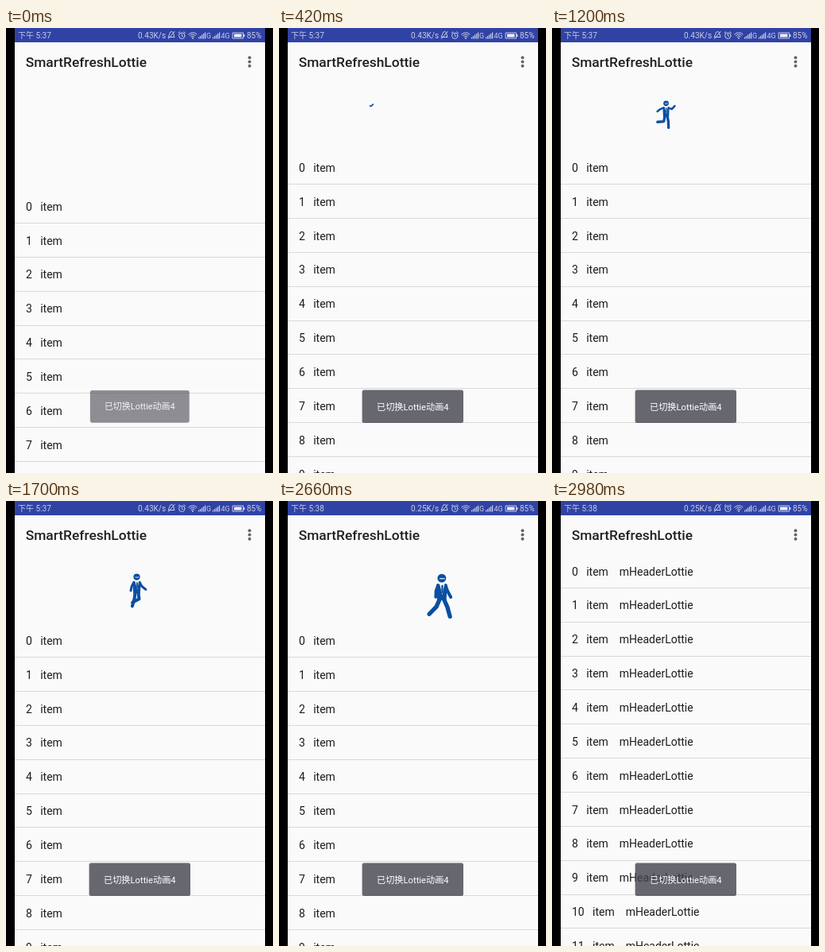
An HTML page with a canvas for the animation above (3040 ms loop, 336 px wide and 560 px high).

```html
<!DOCTYPE html>
<html lang="zh">
<head>
<meta charset="utf-8">
<style>
html, body { margin: 0; width: 100%; height: 100%; overflow: hidden; background: #000; }
canvas { display: block; width: 336px; height: 560px; }
</style>
</head>
<body>
<canvas id="stage"></canvas>
<script>
const W = 336, H = 560, LOOP = 3040;
const LEFT = 11, RIGHT = 326, LIST_TOP = 67, ROW = 42.87;
const PULLED = 136.6, HELD = 87.3;
const FONT = 'Roboto, "Noto Sans CJK SC", "Noto Sans CJK", sans-serif';
const BG = '#fafafa', BLUE = '#0b4fa2', LIGHT = '#c9cdea';
const { PI, sin, cos, max } = Math;

const canvas = document.getElementById('stage');
const c = canvas.getContext('2d');
const dpr = window.devicePixelRatio || 1;
canvas.width = W * dpr;
canvas.height = H * dpr;

const clamp = v => max(0, Math.min(1, v));

function rect(x, y, w, h, color) {
  c.fillStyle = color;
  c.fillRect(x, y, w, h);
}

function text(s, x, y, size, color, weight = 400, align = 'left') {
  c.font = `${weight} ${size}px ${FONT}`;
  c.fillStyle = color;
  c.textAlign = align;
  c.fillText(s, x, y);
}

function trace(points) {
  c.beginPath();
  points.forEach(([x, y]) => c.lineTo(x, y));
}

function line(points, width, color) {
  trace(points);
  c.lineWidth = width;
  c.strokeStyle = color;
  c.stroke();
}

function poly(points, color) {
  trace(points);
  c.fillStyle = color;
  c.fill();
}

function arc(x, y, r, from = 0, to = PI * 2) {
  c.beginPath();
  c.arc(x, y, r, from, to);
}

function disc(x, y, r, color) {
  arc(x, y, r);
  c.fillStyle = color;
  c.fill();
}

function listOffset(t) {
  if (t < 2700) return HELD + (PULLED - HELD) * (1 - clamp(t / 320)) ** 3;
  return HELD * (1 - clamp((t - 2700) / 284)) ** 4;
}

// Two-part limb; angles are measured from straight down, positive to the right.
function limb(x, y, upper, a, lower, b, width) {
  const kx = x + upper * sin(a), ky = y + upper * cos(a);
  line([[x, y], [kx, ky], [kx + lower * sin(b), ky + lower * cos(b)]], width, BLUE);
}

function leg(x, phase) {
  const thigh = .42 * cos(PI * (phase - .65));
  const bend = .15 + 1.2 * max(0, cos(PI * (phase - .1)));
  limb(x, .56, .18, thigh, .22, thigh - bend, .092);
}

// The figure walks right and grows; its height is the unit of length.
function walker(t) {
  const step = (t - 1200) / 400;
  const size = 36 + (t - 1200) * .0151;
  c.save();
  c.beginPath();
  c.rect(114, LIST_TOP, 108, HELD);
  c.clip();
  c.translate(143.5 + (t - 1200) * .042, 91);
  c.scale(size, size);
  c.lineCap = c.lineJoin = 'round';

  leg(-.045, step);
  leg(.045, step + 1);
  const lift = ((1 + cos(2 * PI * step)) / 2) ** 2;
  const swing = .3 + .9 * lift;
  limb(-.08, .26, .13, -swing, .13, -.9 * lift, .07);
  limb(.08, .26, .13, swing, .15, .4 + 2 * lift, .07);

  poly([[-.115, .235], [.115, .235], [.1, .58], [-.1, .58]], BLUE);
  poly([[-.05, .225], [.06, .225], [.015, .47]], '#fff');
  line([[.01, .27], [.013, .41]], .04, BLUE);
  disc(0, .105, .094, BLUE);
  line([[-.04, .115], [.055, .115]], .022, '#dcebf8');
  c.restore();
}

function list(off, loaded) {
  const tail = loaded ? '\u00a0\u00a0\u00a0\u00a0mHeaderLottie' : '';
  c.save();
  c.beginPath();
  c.rect(LEFT, LIST_TOP, RIGHT - LEFT, H - LIST_TOP);
  c.clip();
  for (let i = 0, y = LIST_TOP + off; y < H; i++, y += ROW) {
    text(i + '\u00a0\u00a0\u00a0item' + tail, 24.9, y + 26.5, 14, '#1c1c1c');
    rect(LEFT, Math.floor(y + ROW - .6), RIGHT - LEFT, 1, '#d9d9d9');
  }
  c.restore();
}

function bars(x) {
  for (let i = 0; i < 5; i++) rect(x + i * 2, 11.5 - i * 1.5, 1.2, 2 + i * 1.5, LIGHT);
}

function bell(x, y) {
  arc(x, y, 2.4, PI, 0);
  c.lineTo(x + 3.7, y + 4.5);
  c.lineTo(x - 3.7, y + 4.5);
  c.closePath();
  c.stroke();
  line([[x - 4, y + 6.5], [x + 4, y - 2.5]], 1, LIGHT);
}

function alarm(x, y) {
  arc(x, y, 3.7);
  c.stroke();
  line([[x, y - 2.2], [x, y + .2], [x + 1.5, y + 1]], 1, LIGHT);
  for (const s of [-1, 1]) line([[x + s * 4.3, y - 3.5], [x + s * 2.5, y - 4.9]], 1, LIGHT);
}

function wifi(x, y) {
  for (let r = 2.7; r < 8; r += 2.3) {
    arc(x, y, r, -PI * .76, -PI * .24);
    c.stroke();
  }
  disc(x, y - .3, 1, LIGHT);
}

function battery(x, y) {
  c.strokeRect(x, y, 13, 7);
  rect(x + 1.5, y + 1.5, 9.5, 4, '#eef0fb');
  rect(x + 13.5, y + 2, 1.5, 3, LIGHT);
}

function statusBar(t) {
  const late = t >= 2200;
  rect(LEFT, 0, RIGHT - LEFT, 18, '#3043a5');
  text('下午 ' + (late ? '5:38' : '5:37'), 15, 13, 10, LIGHT);
  text(late ? '0.25K/s' : '0.43K/s', 166, 13, 10, LIGHT);
  c.lineCap = c.lineJoin = 'round';
  c.lineWidth = 1;
  c.strokeStyle = LIGHT;
  bell(208.3, 7);
  alarm(221.3, 9.7);
  wifi(235, 13);
  bars(242);
  text('G', 252, 12.5, 9, LIGHT);
  bars(260);
  text('4G', 270.5, 12.5, 9, LIGHT);
  battery(285.5, 6);
  text('85%', 303, 13, 10, LIGHT);
}

function toolbar() {
  rect(LEFT, 18, RIGHT - LEFT, LIST_TOP - 18, BG);
  text('SmartRefreshLottie', 24.7, 49.2, 17.4, '#202020', 500);
  for (let i = -1; i <= 1; i++) disc(306.5, 42.5 + i * 5.3, 2, '#666');
}

function toast(t) {
  const k = clamp(t / 80);
  c.save();
  c.translate(168.3, 476.3);
  c.scale(.98 + .02 * k, .98 + .02 * k);
  c.globalAlpha = .74 + .26 * k;
  c.beginPath();
  c.roundRect(-63.7, -20.8, 127.4, 41.6, 2.5);
  c.fillStyle = 'rgba(67,67,78,.8)';
  c.fill();
  c.globalAlpha = .9 + .1 * k;
  text('已切换Lottie动画4', 0, 4.2, 11.2, '#fff', 400, 'center');
  c.restore();
}

function draw(t) {
  c.setTransform(dpr, 0, 0, dpr, 0, 0);
  rect(0, 0, W, H, '#000');
  rect(LEFT, 0, RIGHT - LEFT, H, BG);
  if (t >= 340 && t < 2710) walker(t);
  list(listOffset(t), t >= 2680);
  toolbar();
  statusBar(t);
  toast(t);
}

const start = performance.now();
function tick() {
  draw((performance.now() - start) % LOOP);
  requestAnimationFrame(tick);
}
tick();
</script>
</body>
</html>
```
